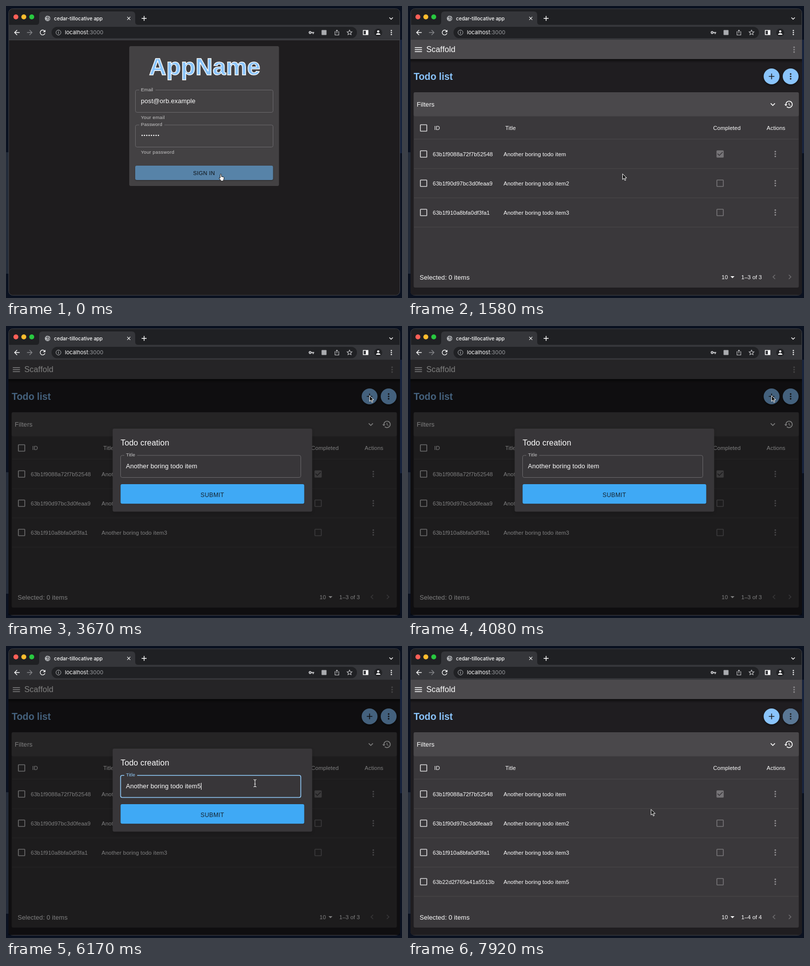
Animation of 800 by 589 pixels, one loop 8 s. Source, as an HTML page:

```html
<!DOCTYPE html>
<html lang="en">
<head>
<meta charset="utf-8">
<title>Todo demo</title>
<style>
  html, body { margin: 0; height: 100%; overflow: hidden; background: #0b101c; }
  svg { display: block; width: 100vw; height: 100vh; }
  text { font-family: "Liberation Sans", Arial, sans-serif; fill: #fff; white-space: pre; }
  .ui { font-family: Inter, Roboto, sans-serif; }
  .fab { filter: drop-shadow(0 2px 2px rgba(0, 0, 0, .5)); }
</style>
</head>
<body>
<svg id="stage" viewBox="0 0 800 589" preserveAspectRatio="none"></svg>
<script>
const LOOP = 8000;
const T = { app: 830, grid: 920, rows: 1420, open: 3330, focus: 5400, type: 5920, submit: 6650, close: 7580, added: 7720 };
const S = 0.806; // page zoom
const CARD = '#434143', DIALOG = '#383639', BLUE = '#8ac4fb';

const ICON = {
  menu: 'M3 18h18v-2H3zm0-5h18v-2H3zm0-7v2h18V6z',
  more: 'M12 4a2 2 0 1 1 0 4a2 2 0 1 1 0-4zm0 6a2 2 0 1 1 0 4a2 2 0 1 1 0-4zm0 6a2 2 0 1 1 0 4a2 2 0 1 1 0-4z',
  add: 'M19 13h-6v6h-2v-6H5v-2h6V5h2v6h6z',
  down: 'M16.6 8.6 12 13.2 7.4 8.6 6 10l6 6 6-6z',
  left: 'M15.4 16.6 10.8 12l4.6-4.6L14 6l-6 6 6 6z',
  right: 'M8.6 16.6 13.2 12 8.6 7.4 10 6l6 6-6 6z',
  drop: 'M7 10l5 5 5-5z',
  back: 'M20 11H7.8l5.6-5.6L12 4l-8 8 8 8 1.4-1.4L7.8 13H20z',
  next: 'M4 11h12.2l-5.6-5.6L12 4l8 8-8 8-1.4-1.4 5.6-5.6H4z',
  close: 'M19 6.4 17.6 5 12 10.6 6.4 5 5 6.4 10.6 12 5 17.6 6.4 19 12 13.4 17.6 19 19 17.6 13.4 12z',
  reload: 'M17.7 6.3A8 8 0 1 0 19.7 14h-2.1a6 6 0 1 1-1.4-6.2L13 11h7V4z',
  key: 'M12.6 10a6 6 0 1 0 0 4H17v4h4v-4h2v-4zM7 14a2 2 0 1 1 0-4a2 2 0 1 1 0 4z',
  share: 'M7 9H5v12h14V9h-2M12 15V3M8.5 6.5 12 3l3.5 3.5',
  star: 'M12 3l2.7 6 6.3.6-4.8 4.2 1.5 6.2L12 16.7 6.3 20l1.5-6.2L3 9.6 9.3 9z',
  history: 'M13 3a9 9 0 0 0-9 9H1l4 4 4-4H6a7 7 0 1 1 2.06 4.94l-1.42 1.42A9 9 0 1 0 13 3zm-1 5v5l4.28 2.54.72-1.21-3.5-2.08V8z',
  box: 'M5 3h14a2 2 0 0 1 2 2v14a2 2 0 0 1-2 2H5a2 2 0 0 1-2-2V5a2 2 0 0 1 2-2zm0 2v14h14V5z',
  checked: 'M5 3h14a2 2 0 0 1 2 2v14a2 2 0 0 1-2 2H5a2 2 0 0 1-2-2V5a2 2 0 0 1 2-2zm5 14 9-9-1.4-1.4L10 14.2l-3.6-3.6L5 12z'
};

const rect = (x, y, w, h, fill, more = '') =>
  `<rect x="${x}" y="${y}" width="${w}" height="${h}" fill="${fill}" ${more}/>`;
const disc = (x, y, r, fill, more = '') => `<circle cx="${x}" cy="${y}" r="${r}" fill="${fill}" ${more}/>`;
const text = (x, y, size, str, more = '', spacing = 0.0095) =>
  `<text x="${x}" y="${y}" font-size="${size}" letter-spacing="${(size * spacing).toFixed(3)}" ${more}>${str}</text>`;
const icon = (name, x, y, fill = '#fff', scale = S, more = '') =>
  `<path d="${ICON[name]}" transform="translate(${x} ${y}) scale(${scale}) translate(-12 -12)" fill="${fill}" fill-rule="evenodd" ${more}/>`;
const lineIcon = (name, x, y) => icon(name, x, y, 'none', .55, 'stroke="#c8c9cc" stroke-width="2"');
const group = (id, body, more = '') => `<g id="${id}" ${more}>${body}</g>`;
const body2 = (x, y, str, more) => text(x, y, 11.28, str, more, .0107);
const hr = y => rect(12, y, 777, 1, '#4a484b');

function field(id, x, y, w, h, label, gap, bg) {
  return rect(x, y, w, h, 'none', `id="${id}Box" rx="3.2" stroke="#6b696c"`) +
    rect(x + 7.5, y - 2, gap, 4, bg) +
    text(x + 11, y + 2.3, 9.67, label, `id="${id}Label" fill-opacity=".7"`);
}

function chrome() {
  const lights = ['#fe5f57', '#febc2e', '#28c840'].map((c, i) => disc(20 + 16 * i, 22, 5, c)).join('');
  return rect(0, 0, 800, 589, '#0a1120') + rect(0, 295, 6, 245, '#232b39') + rect(795, 68, 5, 229, '#17233d') +
    rect(5.5, 5.5, 790, 578, '#1e1c1e', 'rx="8" stroke="#424347"') +
    '<path d="M6 68V15a9 9 0 0 1 9-9H786a9 9 0 0 1 9 9V68Z" fill="#1f2023"/>' +
    rect(6, 38, 789, 30, '#35363a') +
    '<path d="M61 38q6 0 6-6V18q0-7 7-7H254q7 0 7 7v14q0 6 6 6Z" fill="#35363a"/>' +
    rect(6, 68, 789, 1, '#48494c') + lights +
    disc(84, 25, 5.5, '#b5b7ba') +
    '<path d="M80 22l3 1 1 3-2 3M85 20l-1 3 4 1M86 29l1-3 2-1" fill="none" stroke="#55575b" stroke-width="1.3"/>' +
    text(97, 28.5, 10, 'cedar-tillocative app', 'class="ui" font-weight="500"', 0) +
    icon('close', 248, 25, '#fff', .5) + icon('add', 279, 25, '#fff', .72) + icon('down', 778, 25, '#fff', .66) +
    icon('back', 22, 53.5, '#fff', .7) + icon('next', 48, 53.5, '#85868a', .7) + icon('reload', 74, 53.5, '#fff', .7) +
    rect(92, 42, 617, 23, '#202124', 'rx="11.5"') +
    disc(106, 53.5, 5, 'none', 'stroke="#b5b7ba"') + rect(105.4, 52.5, 1.2, 3.5, '#b5b7ba') + rect(105.4, 50.4, 1.2, 1.2, '#b5b7ba') +
    text(119, 57.3, 11, 'localhost<tspan fill="#9a9ca0">:3000</tspan>', 'class="ui"', 0) +
    icon('key', 617, 53.5, '#c8c9cc', .5) + rect(637.5, 48.5, 10, 10, '#a9abaf', 'rx="1"') +
    lineIcon('share', 668.5, 53.5) + lineIcon('star', 694, 53.5) +
    rect(721.7, 49.2, 9.6, 8.6, 'none', 'stroke="#fff" stroke-width="1.4"') + rect(727, 49, 4, 9, '#fff') +
    disc(752, 53.5, 8, '#222326') + disc(752, 51.2, 2.2, '#fff') +
    '<path d="M747.7 58v-1q1-2.3 4.3-2.3t4.3 2.3v1Z" fill="#fff"/>' +
    icon('more', 778.5, 53.5, '#fff', .66);
}

function login() {
  const dots = Array.from({ length: 8 }, (_, i) => disc(275 + 4.7 * i, 261, 1.35, '#fff')).join('');
  return rect(249, 81, 302.5, 282, CARD, 'rx="3"') +
    text(289, 138.5, 48.2, 'AppName', `font-weight="bold" style="fill:${BLUE}" stroke="#fff" stroke-width="1.4"`, 0) +
    field('mail', 261.5, 169.5, 278, 45, 'Email', 33, CARD) +
    field('pass', 261.5, 240, 278, 44.5, 'Password', 51, CARD) +
    group('logText', text(272.5, 196, 12.9, 'post@orb.example') + dots) +
    text(272.5, 227.7, 9.67, 'Your email', 'fill-opacity=".7"', .0333) +
    text(272.5, 298, 9.67, 'Your password', 'fill-opacity=".7"', .0333) +
    rect(261, 322, 278.5, 29, '#5783a8', 'id="signBox" rx="3.2" style="filter:drop-shadow(0 1px 1px rgba(0,0,0,.4))"') +
    text(378, 340.7, 11.28, 'SIGN IN', 'id="signText"', .02857) + spinner('signSpin', 372, 336.5);
}

const spinner = (id, x, y) =>
  group(id, '<circle r="6" fill="none" stroke="#858386" stroke-width="1.3"/>', `data-x="${x}" data-y="${y}"`);

function row(i, id, title) {
  const y = 298.5 + 59 * i;
  return icon('box', 31.5, y, '#d6d5d7') + body2(50, y + 4, id) + body2(193, y + 4, title) +
    icon(i ? 'box' : 'checked', 630.5, y, '#767477') + icon('more', 742, y, '#908e91') + hr(y + 29);
}

function app() {
  return rect(5, 68, 791, 515, '#1f1d20', 'rx="6"') + rect(5, 107, 791, 8, 'url(#shade)') +
    rect(5, 68, 791, 39, '#4b494c') +
    icon('menu', 21, 88) + text(37, 93.2, 16.1, 'Scaffold', '', .0075) + icon('more', 780, 88, '#8d8b8e') +
    text(11.5, 148.7, 19.3, 'Todo list', `font-weight="bold" style="fill:${BLUE}"`, 0) +
    disc(734.5, 142, 16, BLUE, 'class="fab"') + icon('add', 734.5, 142, '#1c1c1e') +
    disc(773, 142, 16, BLUE, 'class="fab"') + disc(773, 142, 16, '#2a2a2e', 'id="fabDim" opacity=".5"') + icon('more', 773, 142, '#1c1c1e') +
    rect(11.5, 174, 778, 394, '#3a383b', 'rx="3"') +
    rect(11.5, 174, 778, 48.5, '#4a484b', 'rx="3"') +
    rect(11.5, 357, 778, 211, CARD, 'id="blank" rx="3"') +
    text(17.7, 202.7, 12.9, 'Filters') + icon('down', 737, 198.5) + icon('history', 769, 198.5) +
    group('head', icon('box', 31.5, 246, '#d6d5d7') + body2(53, 250, 'ID') + body2(196.5, 250, 'Title') +
      body2(616.5, 250, 'Completed') + body2(724.5, 250, 'Actions') + hr(268)) +
    group('rows', row(0, '63b1f9088a72f7b52548', 'Another boring todo item') +
      row(1, '63b1f90d97bc3d0feaa9', 'Another boring todo item2') + row(2, '63b1f910a8bfa0df3fa1', 'Another boring todo item3')) +
    group('added', row(3, '63b22d2f765a41a5513b', 'Another boring todo item5')) +
    group('foot', text(23.5, 5, 12.9, 'Selected: 0 items') +
      group('size', body2(0, 4.5, '10') + icon('drop', 22, 0)) +
      body2(715, 4, '', 'id="range" text-anchor="end"') +
      icon('left', 739.5, 0, '#6d6b6e') + icon('right', 771.5, 0, '#fff', S, 'id="nextPage"'));
}

function dialog() {
  return rect(5, 68, 791, 515, '#000', 'opacity=".5"') +
    rect(215.5, 207, 403, 167.5, DIALOG, 'rx="3" style="filter:drop-shadow(0 2px 3px rgba(0,0,0,.15))"') +
    text(231.5, 240.7, 16.1, 'Todo creation', '', .0075) +
    field('todo', 231.5, 261, 364, 44.5, 'Title', 26, DIALOG) +
    text(242.3, 287.3, 12.9, '', 'id="todoText"') + rect(394, 276, 1, 14, '#fff', 'id="caret"') +
    rect(231.5, 319, 371, 39.5, '#3fa9f5', 'id="sendBox" rx="3.2" style="filter:drop-shadow(0 1px 1px rgba(0,0,0,.25))"') +
    text(393, 345.3, 12.1, 'SUBMIT', 'id="sendText"', .02857) + spinner('sendSpin', 389.5, 341);
}

function cursors() {
  const ink = 'fill="#111" stroke="#fff" stroke-width="1" stroke-linejoin="round"';
  return group('mouse',
    `<path id="arrow" d="M0 0V11.5L2.7 9 4.6 13.4 6.5 12.6 4.6 8.4H8.4Z" ${ink}/>` +
    '<path id="hand" d="M-.8 2q0-1.5 1.2-1.5t1.2 1.5v3.5l4 .8q1.7.4 1.4 2.2l-.8 3.5q-.4 2.5-2.5 2.5H2.3q-1.3 0-2-1.2L-2.7 9.5q-.7-1.2.3-1.6t1.6.8Z" fill="#fff" stroke="#111" stroke-width="1"/>' +
    '<path id="beam" d="M-3-7q3 0 3 2q0-2 3-2M0-5V5M-3 7.5q3 0 3-2q0 2 3 2M-1.5 2h3" fill="none" stroke="#e8e8e8" stroke-width="1.2"/>');
}

document.getElementById('stage').innerHTML =
  `<defs><linearGradient id="shade" x2="0" y2="1"><stop stop-opacity=".55"/><stop offset="1" stop-opacity="0"/></linearGradient></defs>` +
  chrome() + group('login', login()) + group('app', app()) + group('dialog', dialog()) + cursors();

const el = {};
document.querySelectorAll('[id]').forEach(n => el[n.id] = n);
const set = (id, attrs) => { for (const k in attrs) el[id].setAttribute(k, attrs[k]); };
const show = (id, on) => { el[id].style.display = on ? '' : 'none'; };
const clamp = v => Math.min(1, Math.max(0, v));
const ease = v => v * v * (3 - 2 * v);
const mix = (a, b, k) => a + (b - a) * k;
const blend = (a, b, k) => `rgb(${a.map((v, i) => Math.round(mix(v, b[i], k)))})`;
const GREY = [80, 78, 81];

const PATH = [[0, 433.5, 338.5], [2200, 433.5, 338.5], [2670, 597.5, 215.5], [3080, 734.5, 140.5],
  [4250, 734.5, 140.5], [5050, 503, 276.5], [6250, 503, 276.5], [6560, 491, 329.5], [LOOP, 491, 329.5]];

function mouseAt(t) {
  const i = Math.max(1, PATH.findIndex(p => p[0] > t));
  const [a, b] = [PATH[i - 1], PATH[i]], k = ease(clamp((t - a[0]) / (b[0] - a[0])));
  return [mix(a[1], b[1], k), mix(a[2], b[2], k)];
}

function mouseKind(t, x, y) {
  if (t < 200) return 'hand';
  if (t < T.open) return Math.hypot(x - 734.5, y - 142) < 16 ? 'hand' : 'arrow';
  if (t >= T.submit) return 'arrow';
  if (x > 231 && x < 596 && y > 261 && y < 306) return 'beam';
  return x > 231 && x < 603 && y > 319 && y < 358 ? 'hand' : 'arrow';
}

function spin(id, age) {
  show(id, age >= 0);
  const p = (Math.max(0, age) / 1400) % 1, k = ease(clamp(p * 2)), q = ease(clamp(p * 2 - 1));
  const len = 2 * Math.PI * 6, { x, y } = el[id].dataset;
  set(id, { transform: `translate(${x} ${y}) rotate(${p * 360 - 90})`,
    'stroke-dasharray': `${len * mix(.01, .8, k)} ${len * 2}`, 'stroke-dashoffset': -len * (.12 * k + .87 * q) });
}

function draw(t) {
  show('login', t < T.app);
  show('app', t >= T.app);

  const busy = t >= 80;
  set('signBox', { fill: blend([87, 131, 168], [90, 88, 90], clamp((t - 40) / 170)) });
  el.signText.style.fill = busy ? '#858386' : '#0c1014';
  set('signText', { x: busy ? 386 : 378 });
  set('logText', { opacity: busy ? .5 : 1 });
  spin('signSpin', busy ? t - 80 : -1);

  const loaded = t >= T.rows, added = t >= T.added;
  show('blank', t < T.grid);
  show('head', t >= T.grid);
  show('rows', loaded);
  show('added', added);
  show('fabDim', t >= T.close);
  set('foot', { transform: `translate(0 ${t < T.grid ? 335 : 546.5})` });
  set('size', { transform: `translate(${loaded ? 633.5 : 565.5} 0)` });
  el.range.textContent = added ? '1–4 of 4' : loaded ? '1–3 of 3' : '1–10 of more than 10';
  set('nextPage', { fill: loaded ? '#6d6b6e' : '#fff' });

  const alpha = t < T.close ? ease(clamp((t - T.open) / 225)) : 1 - ease(clamp((t - T.close) / 195));
  show('dialog', alpha > 0);
  set('dialog', { opacity: alpha });
  const sent = t >= T.submit, focus = t >= T.focus && !sent, typed = t >= T.type;
  el.todoText.textContent = 'Another boring todo item' + (typed ? '5' : '');
  set('todoText', { 'fill-opacity': sent ? .55 : 1 });
  set('todoBox', { stroke: focus ? '#90caf9' : sent ? '#59575a' : '#6b696c', 'stroke-width': focus ? 1.6 : 1 });
  el.todoLabel.style.fill = focus ? '#90caf9' : '#fff';
  set('todoLabel', { 'fill-opacity': focus ? 1 : sent ? .5 : .7 });
  show('caret', focus && (t - (typed ? T.type : T.focus)) % 1000 < 500);
  set('caret', { x: typed ? 394 : 386.5 });
  set('sendBox', { fill: blend([63, 169, 245], GREY, clamp((t - T.submit) / 250)) });
  el.sendText.style.fill = sent ? '#858386' : '#14222e';
  set('sendText', { x: sent ? 402 : 393 });
  spin('sendSpin', t - T.submit);

  const [x, y] = mouseAt(t), kind = mouseKind(t, x, y);
  set('mouse', { transform: `translate(${x.toFixed(2)} ${y.toFixed(2)})` });
  ['arrow', 'hand', 'beam'].forEach(k => show(k, k === kind));
}

const start = performance.now();
function tick() {
  draw((performance.now() - start) % LOOP);
  requestAnimationFrame(tick);
}
tick();
</script>
</body>
</html>
```
